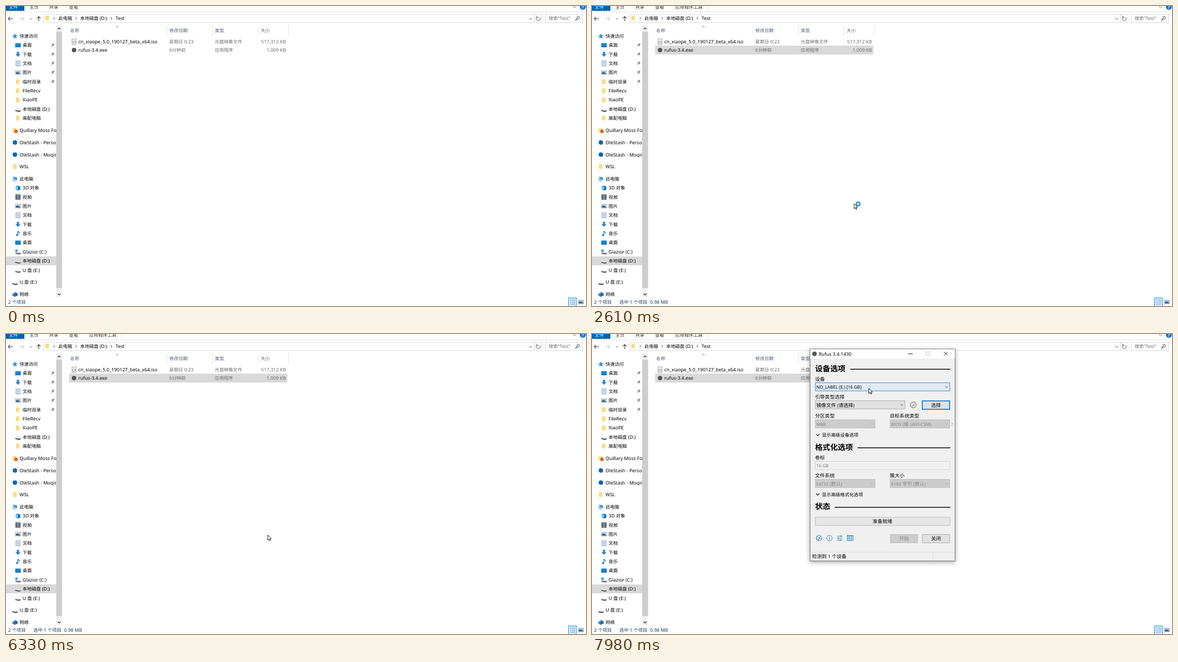
An HTML page for the animation above (8000 ms loop, 1040 by 538 pixels).

```html
<!DOCTYPE html>
<html lang="zh-CN">
<head>
<meta charset="utf-8">
<title>文件管理</title>
<style>
html, body { margin: 0; width: 100%; height: 100%; overflow: hidden; background: #fff; }
svg { display: block; }
text { font-family: 'Noto Sans', 'Noto Sans CJK SC', sans-serif; white-space: pre; text-rendering: geometricPrecision; }
#win { transform-origin: 521px 217px; filter: drop-shadow(0 2px 4px rgba(0,0,0,.34)); }
</style>
</head>
<body>
<svg id="stage" width="1040" height="538" viewBox="0 0 1040 538"></svg>
<script>
const LOOP = 8000;

// ---------- drawing helpers ----------
const rect = (x, y, w, h, fill, stroke = 'none', sw = 1) =>
  `<rect x="${x}" y="${y}" width="${w}" height="${h}" fill="${fill}" stroke="${stroke}" stroke-width="${sw}"/>`;
const line = (d, stroke, sw = 1) => `<path d="${d}" fill="none" stroke="${stroke}" stroke-width="${sw}"/>`;
const shape = (d, fill) => `<path d="${d}" fill="${fill}"/>`;
const dot = (x, y, r, fill, stroke = 'none', sw = 1) =>
  `<circle cx="${x}" cy="${y}" r="${r}" fill="${fill}" stroke="${stroke}" stroke-width="${sw}"/>`;
const at = (x, y, body) => `<g transform="translate(${x} ${y})">${body}</g>`;
const group = (id, body) => `<g id="${id}">${body}</g>`;

// Chinese runs and Latin runs get their own sizes; y is the middle of the line.
function text(x, y, str, { fill = '#000', han = 8.2, latin = 8.5, anchor = 'start', weight = 400 } = {}) {
  const runs = str.match(/[\u4e00-\u9fff]+|[^\u4e00-\u9fff]+/g)
    .map(run => `<tspan font-size="${/[\u4e00-\u9fff]/.test(run) ? han : latin}">${run}</tspan>`).join('');
  return `<text x="${x}" y="${y + han * 0.37}" fill="${fill}" text-anchor="${anchor}" font-weight="${weight}">${runs}</text>`;
}

const chevron = {
  down: (x, y, c = '#444', s = 2.6, w = 1) => line(`M${x - s} ${y - s / 2}l${s} ${s} ${s} ${-s}`, c, w),
  up: (x, y, c = '#444', s = 2.6, w = 1) => line(`M${x - s} ${y + s / 2}l${s} ${-s} ${s} ${s}`, c, w),
  right: (x, y, c = '#444', s = 2.2) => line(`M${x - s / 2} ${y - s}l${s} ${s} ${-s} ${s}`, c),
};

// ---------- icons, centred on 0,0 ----------
const drive = shape('M-5 .4L-3-.8H4.8V1.6L2 2.2Z', '#dcdcdc') + shape('M-5 .4L1.5 1.8 4.8 1V2.6L1.5 3.6-5 2Z', '#444');
const screen = rect(-5, -3.8, 10, 7, '#0e86d8') + rect(-5, 2.2, 10, 1.2, '#0a5fa3');
const icons = {
  star: shape('M0-5L1.4-1.6 5-1.5 2.2.8 3.2 4.4 0 2.4-3.2 4.4-2.2.8-5-1.5-1.4-1.6Z', '#2b8fdc'),
  desktop: screen,
  download: shape('M-2-4.6H2V-.4H4.6L0 4.6-4.6-.4H-2Z', '#2f86d6'),
  doc: rect(-3.6, -4.5, 7.2, 9, '#f4f8fc', '#7d8fa3', .9) + line('M-2-2H2M-2 0H2M-2 2H2', '#5da0d8', .9),
  picture: rect(-4.7, -3.3, 9.4, 6.6, '#fff', '#8a9aa8', .8) + rect(-3.8, -2.4, 7.6, 2.3, '#8cc5f0') +
    shape('M-3.8 2.4V.2L-1-1 3.8 1V2.4Z', '#2d5576'),
  folder: rect(-3, -4.2, 6, 8.4, '#ffdf85') + rect(-3, -4.2, 1.4, 8.4, '#f5cc62'),
  drive,
  folderApp: rect(-4, -4.5, 6.5, 9, '#ffdf85') + dot(2, 1.8, 3.2, '#d0662c'),
  cloud: dot(0, 0, 4, '#0a67b8'),
  pc: shape('M-3-4L4-2.6V2.4L-3 1Z', '#3d9ee4') + line('M-5 2.2L1.5 4.2', '#8d9da9', 1.4),
  cube: shape('M-4-3L0-4.6 4-3V3L0 4.6-4 3Z', '#2eb0e8') + shape('M0-1.4L4-3V3L0 4.6Z', '#1476b8') + rect(-2.6, -1, 2, 3, '#d8f2ff'),
  video: rect(-4.6, -4.6, 9.2, 9.2, '#39424e') + rect(-2.6, -3.4, 5.2, 3, '#5ea9e0') + rect(-2.6, .5, 5.2, 3, '#c28d4e') +
    '<path d="M-3.7-4V4M3.7-4V4" stroke="#ddd" stroke-width=".8" stroke-dasharray="1 1"/>',
  music: line('M-.2-4.5V2.6M-.2-4.2Q3-3 2.4.2', '#1683d8', 1.4) + dot(-1.7, 2.8, 1.9, '#1683d8'),
  system: at(.5, 1.2, drive) + rect(-4.8, -4, 4, 4, '#0c9fe4'),
  network: shape('M-5-.5L1-4.5 5-1 5 2-1 4.5-5 2Z', '#4b8fc9') + shape('M-1-1L5-2V2L-1 4.5Z', '#2667a0'),
  iso: rect(-3.7, -5, 7.4, 10, '#fafafa', '#8c8c8c', .8) + dot(0, .8, 2.4, '#d4d8dc', '#8a8a8a', .6) + dot(0, .8, .7, '#fff'),
  app: dot(0, 0, 4, '#555'),
  pin: '<g transform="rotate(40)">' + rect(-1.5, -3.4, 3, 3.4, '#7c868f') + rect(-2.4, -.4, 4.8, 1, '#7c868f') + line('M0 0V4', '#7c868f', .8) + '</g>',
};
const icon = (name, x, y) => at(x, y, icons[name]);

// ---------- file browser ----------
// indent 0 or 1, icon, label, y, pinned
const tree = [
  [0, 'star', '快速访问', 54], [1, 'desktop', '桌面', 70.4, 1], [1, 'download', '下载', 86.7, 1],
  [1, 'doc', '文档', 103, 1], [1, 'picture', '图片', 119.4, 1], [1, 'folder', '临时目录', 135.8, 1],
  [1, 'folder', 'FileRecv', 152], [1, 'folder', 'XiaoPE', 168.4], [1, 'drive', '本地磁盘 (D:)', 184.8],
  [1, 'folder', '高配电脑', 201], [0, 'folderApp', 'Quillary Moss Fo', 223], [0, 'cloud', 'OleStash - Perso', 244.7],
  [0, 'cloud', 'OleStash - Moqin', 266.5], [0, 'folder', 'WSL', 288], [0, 'pc', '此电脑', 310],
  [1, 'cube', '3D 对象', 326.3], [1, 'video', '视频', 342.6], [1, 'picture', '图片', 359],
  [1, 'doc', '文档', 375.4], [1, 'download', '下载', 391.7], [1, 'music', '音乐', 408],
  [1, 'desktop', '桌面', 424.4], [1, 'system', 'Glazior (C:)', 440.7], [1, 'drive', '本地磁盘 (D:)', 457],
  [1, 'drive', 'U 盘 (E:)', 473.5], [0, 'drive', 'U 盘 (E:)', 495.3], [0, 'network', '网络', 517],
];

function sidebar() {
  const items = tree.map(([indent, name, label, y, pinned]) =>
    icon(name, 16 + indent * 5.5, y + (name === 'drive' ? 1.5 : 0)) + text(24.3 + indent * 5.5, y, label) +
    (pinned ? icon('pin', 83.5, y) : '')).join('');
  return `<clipPath id="side"><path d="M0 34H90V522H0Z"/></clipPath><g clip-path="url(#side)">` +
    rect(0, 449, 90, 16, '#d9d9d9') + items + '</g>' +
    rect(90, 35, 10.5, 487, '#f0f0f0') + rect(90, 46, 10.5, 460, '#cdcdcd') +
    chevron.up(95.3, 40.5, '#444', 2.6, 1.3) + chevron.down(95.3, 517, '#444', 2.6, 1.3);
}

function ribbon() {
  return rect(0, 0, 33, 8.7, '#0063b1') + text(5, 2, '文件', { fill: '#fff' }) +
    [[42, '主页'], [77.5, '共享'], [113, '查看']].map(([x, s]) => text(x, 2, s, { fill: '#333' })).join('') +
    line('M0 10.5H1040', '#e2e3e4') + chevron.down(1019.5, 2, '#777', 3) +
    dot(1034.3, 1.5, 5.3, '#0078d7') + text(1034.3, 2, '?', { fill: '#fff', anchor: 'middle', weight: 700 });
}

function addressBar() {
  const gray = '#6d6d6d';
  return line('M12 22.7H4M7.3 19.4L4 22.7 7.3 26', '#444', 1.1) + line('M24 22.7H32M28.7 19.4L32 22.7 28.7 26', '#ccc', 1.1) +
    chevron.down(45, 22.7, '#555', 2) + line('M58.7 27V18.8M55.3 22.2L58.7 18.8 62 22.2', '#444', 1.2) +
    rect(67.5, 15, 893.5, 14.8, '#fff', '#d9d9d9') + icon('folder', 74, 21.7) +
    [86.5, 125.8, 189].map(x => chevron.right(x, 22)).join('') +
    text(94, 22, '此电脑') + text(133, 22, '本地磁盘 (D:)') + text(196.5, 22, 'Test') +
    chevron.down(941, 22.7, '#555') + line('M947.5 15V30', '#d9d9d9') +
    line('M952.2 19.8A3.6 3.6 0 1 0 956.8 20M952 17.8V20.4H954.8', '#555', 1) +
    rect(967.5, 15, 66.5, 14.8, '#fff', '#d9d9d9') + text(973, 22, '搜索"Test"', { fill: gray }) +
    dot(1026, 21, 2.3, 'none', '#444', 1) + line('M1024.3 22.8L1021 26', '#444', 1.2);
}

function fileRow(y, name, label, date, kind, size) {
  const soft = { fill: '#6d6d6d' };
  return icon(name, 122, y - .3) + text(129.7, y, label) + text(292.8, y, date, soft) +
    text(374.3, y, kind, soft) + text(502, y, size, { ...soft, anchor: 'end' });
}

function fileList() {
  const head = [[115, '名称'], [292.8, '修改日期'], [374.5, '类型'], [456.5, '大小']]
    .map(([x, s]) => text(x, 44, s, { fill: '#4c5a6b' })).join('');
  return head + chevron.up(199.7, 37, '#777', 2.3) + line('M288.5 35V53M370.5 35V53M452 35V53M506.5 35V53', '#e5e5e5') +
    '<rect id="mark" x="113.5" y="71.5" width="390.5" height="15"/>' +
    fileRow(64.3, 'iso', 'cn_xiaope_5.0_190127_beta_x64.iso', '星期日 0:23', '光盘映像文件', '517,312 KB') +
    fileRow(79.2, 'app', 'rufus-3.4.exe', '6分钟前', '应用程序', '1,009 KB');
}

function statusBar() {
  const ink = { fill: '#1e395b' };
  return text(3.8, 531, '2 个项目', ink) +
    group('picked', text(149, 2, '应用程序工具', { fill: '#333' }) + line('M208.5 0V7', '#ddd') +
      text(49, 531, '选中 1 个项目', ink) + text(104, 531, '0.98 MB', ink)) +
    rect(1008.5, 523.5, 14.5, 15, '#cce8ff', '#26a0da') +
    line('M1011 527.5H1014M1011 531H1014M1011 534.5H1014', '#7fa3c0') +
    line('M1015 527.5H1020.5M1015 531H1020.5M1015 534.5H1020.5', '#888', .9) + icon('picture', 1031, 530.8);
}

// ---------- dialog ----------
const han = 8.8, latin = 7.9;
const label = (x, y, s, more) => text(x, y, s, { han, latin, ...more });
const heading = (y, s, x) => text(400, y, s, { han: 13.6, weight: 700 }) + rect(x, y + .8, 642.5 - x, 1.4, '#000');
const expander = (y, s) => chevron.down(404.7, y, '#222', 2.9, 1.2) + text(412.3, y, s);
function combo(x, y, w, s, disabled = true, id = '') {
  return `<rect ${id && `id="${id}"`} x="${x}" y="${y}" width="${w}" height="14.6" fill="${disabled ? '#ccc' : '#e1e1e1'}" stroke="${disabled ? '#bfbfbf' : '#adadad'}"/>` +
    label(x + 1.8, y + 7.6, s, { fill: disabled ? '#838383' : '#000' }) +
    chevron.down(x + w - 5.5, y + 7.5, disabled ? '#aaa' : '#555', 2.4);
}
const button = (x, y, s, fill, stroke, ink = '#000', sw = 1) =>
  rect(x, y, 49, 15, fill, stroke, sw) + label(x + 24.5, y + 7.7, s, { fill: ink, anchor: 'middle' });

function toolIcons() {
  const c = '#2f7fb8', thin = .9;
  return dot(407, 366, 5, 'none', c, thin) +
    line('M403 363.5L408 365.5 410.5 362M408 365.5L406 370.5M402.5 367L406.5 368.5M408 365.5L411.5 368', c, thin) +
    dot(425.7, 366, 5, 'none', c, thin) + line('M425.7 365V369M425.7 362.7V363.9', c) +
    line('M439.2 362.5H449.2M439.2 366H449.2M439.2 369.5H449.2', c, thin) +
    line('M446.5 361.2V363.8M442 364.7V367.3M445.5 368.2V370.8', c, 1.4) +
    rect(457.7, 361.5, 10.3, 9, '#fff', c, thin) +
    line('M457.7 362.5H468M457.7 365.2H468M457.7 367.8H468M461 363V370.5M464.6 363V370.5', c, .8);
}

function dialog() {
  return rect(391, 27, 260, 380, '#f0f0f0', '#6e6e6e') + rect(391.5, 27.5, 259, 16.5, '#fff') +
    icon('app', 399, 35.5) + text(406.5, 35.6, 'Rufus 3.4.1430') +
    line('M567 35.5H575', '#222') + rect(599, 32.2, 6.5, 6.5, 'none', '#ccc') + line('M631 32L637.6 38.6M637.6 32L631 38.6', '#222') +
    heading(61.7, '设备选项', 463) + label(400, 81, '设备') +
    combo(400.5, 87.5, 241, 'NO_LABEL (E:) [16 GB]', false, 'device') +
    label(400, 113, '引导类型选择') + combo(400.5, 119.7, 160.5, '镜像文件 (请选择)', false) +
    dot(576, 127.2, 5.2, 'none', '#444', .9) + line('M573.3 127.3L575.3 129.3 578.9 125.5', '#444') +
    button(592.3, 120, '选择', '#e1e1e1', '#0078d7', '#000', 1.6) +
    label(400, 147, '分区类型') + label(534, 147, '目标系统类型') +
    combo(400.5, 153.8, 107, 'MBR') + combo(534.5, 153.8, 107, 'BIOS (或 UEFI-CSM)') +
    label(643.8, 161.5, '?', { fill: '#999' }) + expander(181, '显示高级设备选项') +
    heading(202.6, '格式化选项', 476) + label(400, 221.7, '卷标') +
    rect(400.5, 228.5, 241.5, 14.5, '#f0f0f0', '#d5d5d5') + label(402.3, 236, '16 GB', { fill: '#777' }) +
    label(400, 254, '文件系统') + label(534, 254, '簇大小') +
    combo(400.5, 260.7, 107, 'FAT32 (默认)') + combo(534.5, 260.7, 107, '8192 字节 (默认)') +
    expander(287.7, '显示高级格式化选项') + heading(309.2, '状态', 435) +
    rect(400.5, 328.5, 241.5, 14.8, '#e6e6e6', '#bcbcbc') + label(520.7, 336, '准备就绪', { anchor: 'middle' }) +
    toolIcons() + button(535, 359.5, '开始', '#ccc', '#bfbfbf', '#838383') + button(592.3, 359.5, '关闭', '#e1e1e1', '#adadad') +
    line('M391.5 391.2H650.5M611.5 392V406', '#dcdcdc') + label(394.5, 399, '检测到 1 个设备', { latin: 8.3 });
}

const pointer = group('ring', dot(7.6, .8, 3.3, '#fff', '#168bd6', 2.1)) +
  '<path d="M.5.5V9.6L2.6 7.7 4 10.9 5.4 10.3 4 7.1H6.8Z" fill="#fff" stroke="#111" stroke-width=".9"/>';

document.getElementById('stage').innerHTML = rect(0, 0, 1040, 538, '#fff') + ribbon() + addressBar() +
  sidebar() + fileList() + statusBar() + group('win', dialog()) + group('cursor', pointer);

// ---------- timeline: [ms, values...], each held until the next ----------
const [mark, picked, win, device, cursor, ring] =
  ['mark', 'picked', 'win', 'device', 'cursor', 'ring'].map(id => document.getElementById(id));

const path = [
  [0, 978, 560], [430, 978, 533], [530, 978, 530],
  [980, 940, 508], [1060, 825, 446], [1130, 655, 358], [1210, 480, 268], [1290, 335, 192], [1370, 240, 142],
  [1450, 195, 118], [1530, 178, 110], [1610, 180, 103], [1690, 183, 95], [1760, 185, 90],
  [1840, 184, 86], [1920, 182, 82], [1990, 181, 80], [2070, 180, 79],
  [2370, 240, 135], [2450, 340, 240], [2530, 430, 320], [2610, 469.5, 354],
  [3990, 462, 359], [4070, 457, 362], [4310, 459, 363], [4390, 463, 362], [4460, 467, 361], [4540, 469, 360],
  [7090, 471, 345], [7170, 476, 302], [7250, 482, 245], [7330, 487, 190], [7410, 491, 150], [7490, 494, 125], [7570, 495, 113],
  [7650, 495, 108], [7730, 495, 104], [7810, 496, 100], [7890, 496, 98], [7980, 496, 97],
];
const marks = [
  [0, 'none', 'none'], [1840, '#e5f3ff', '#e5f3ff'], [2210, '#cce8ff', '#99d1ff'],
  [2450, '#d9d9d9', '#d9d9d9'], [3540, '#cce8ff', '#99d1ff'], [6330, '#d9d9d9', '#d9d9d9'],
];
const opening = [[0, 0, 1], [6800, .3, .955], [6880, .73, .985], [6950, .94, .996], [7020, 1, 1]];
const held = (steps, t) => steps.findLast(step => step[0] <= t);
const show = (node, on) => node.style.display = on ? '' : 'none';
const paint = (node, fill, stroke) => { node.setAttribute('fill', fill); node.setAttribute('stroke', stroke); };

function render(t) {
  const [, x, y] = held(path, t);
  cursor.setAttribute('transform', `translate(${x} ${y})`);
  show(ring, t >= 2290 && t < 6330);
  show(picked, t >= 2210);
  const [, fill, stroke] = held(marks, t);
  paint(mark, fill, stroke);
  const [, opacity, scale] = held(opening, t);
  show(win, opacity > 0);
  win.style.opacity = opacity;
  win.style.transform = `scale(${scale})`;
  const hover = t >= 7810;
  paint(device, hover ? '#e0ebf5' : '#e1e1e1', hover ? '#4a90c8' : '#adadad');
}

const start = performance.now();
function tick() {
  render((performance.now() - start) % LOOP);
  requestAnimationFrame(tick);
}
tick();
</script>
</body>
</html>
```
